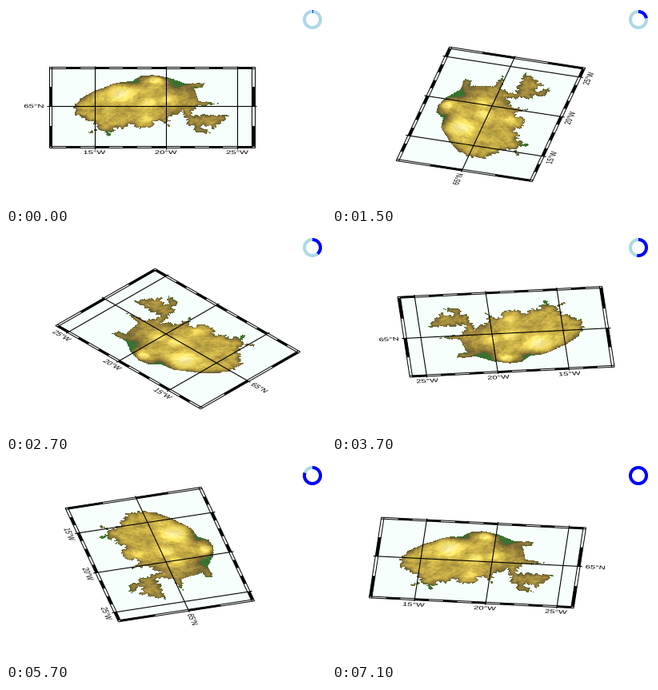
A matplotlib script for the animation above (7200 ms loop, 400 px wide and 250 px high).

```python
import numpy as np
import matplotlib.pyplot as plt
from matplotlib.animation import FuncAnimation
from matplotlib.collections import LineCollection, PolyCollection
from matplotlib.patches import PathPatch, Polygon, Wedge
from matplotlib.path import Path
from matplotlib.textpath import TextPath
from matplotlib.transforms import Affine2D

plt.rcParams["font.family"] = "Liberation Sans"

STAGE_W, STAGE_H, DPI = 400, 250, 100
FRAMES, INTERVAL = 72, 100
TILT = np.sin(np.radians(35))
SCALE = 250 / 14          # pixels per degree of longitude
BORDER = 3.4              # width of the chequered frame
PX = 72 / DPI             # one pixel in points
SEA = "#f6fffb"
rng = np.random.default_rng(7)


def mercator(lat):
    return np.degrees(np.log(np.tan(np.radians(45 + np.asarray(lat) / 2))))


def to_x(lon):
    return (np.asarray(lon) + 20) * SCALE


def to_y(lat):
    return (mercator(lat) - mercator(65)) * SCALE


X0, X1 = to_x(-26), to_x(-12)
Y0, Y1 = to_y(63), to_y(67)

# Capes and bays as (lon, lat), anticlockwise from the south-west.
CAPES = [
    (-22.7, 63.83), (-21.3, 63.85), (-20.3, 63.56), (-19.1, 63.4),
    (-18.2, 63.47), (-17.6, 63.74), (-16.6, 63.8), (-15, 64.25),
    (-14, 64.65), (-13.5, 65.08), (-13.65, 65.5), (-14.7, 65.8),
    (-15.2, 66.12), (-14.53, 66.38), (-15.4, 66.24), (-16, 66.53),
    (-16.5, 66.2), (-17.1, 66.2), (-17.5, 65.98), (-18.1, 66.18),
    (-18.8, 66.18), (-19.5, 65.75), (-20.2, 66.12), (-20.35, 65.66),
    (-21.15, 65.25), (-21.4, 65.9), (-22.4, 66.46), (-23.2, 66.4),
    (-22.6, 66.05), (-23.4, 66.18), (-24.5, 65.5), (-21.8, 65.46),
    (-22.2, 65.07), (-24.05, 64.9), (-22.3, 64.78), (-22, 64.1),
    (-22.6, 64.08)]

# Ice caps and lowlands: lon, lat, spread in pixels, metres.
RELIEF = [
    (-16.9, 64.42, 11, 800), (-18.8, 64.83, 7, 550), (-20.1, 64.7, 7, 450),
    (-19.2, 63.65, 6, 700), (-18.6, 65.7, 8, 350), (-20.6, 63.9, 9, -430),
    (-17.8, 63.75, 6, -350), (-16, 66.4, 8, -250)]

LEVELS = [0, 140, 290, 580, 920, 1700]
COLOURS = np.array([(58, 115, 50), (116, 100, 50), (146, 124, 58),
                    (200, 174, 70), (248, 224, 98), (253, 245, 185)])


def noise(shape, cell):
    """Smooth value noise between -1 and 1."""
    rows, cols = shape
    grid = rng.uniform(-1, 1, (int(rows / cell) + 2, int(cols / cell) + 2))

    def split(n):
        pos = np.arange(n) / cell
        i = pos.astype(int)
        f = pos - i
        return i, f * f * (3 - 2 * f)

    r, fr = split(rows)
    c, fc = split(cols)
    fr = fr[:, None]
    top = grid[r][:, c] * (1 - fc) + grid[r][:, c + 1] * fc
    low = grid[r + 1][:, c] * (1 - fc) + grid[r + 1][:, c + 1] * fc
    return top * (1 - fr) + low * fr


def neighbours(a):
    return [a] + [np.roll(a, d, axis) for axis in (0, 1) for d in (-1, 1)]


def coastline():
    """Join the capes and cut random fjords, deepest in the north."""
    lon, lat = np.array(CAPES + CAPES[:1]).T
    ring = to_x(lon) + 1j * to_y(lat)
    length = np.append(0, np.cumsum(abs(np.diff(ring))))
    s = np.arange(0, length[-1], 0.7)
    p = np.interp(s, length, ring.real) + 1j * np.interp(s, length, ring.imag)
    tangent = np.gradient(p)
    inward = 1j * tangent / abs(tangent)
    knots = np.arange(0, length[-1] + 3, 2.4)
    cut = np.interp(s, knots, rng.random(knots.size) ** 2)
    depth = 7.5 * np.clip((p.imag - to_y(64.55)) / 30, 0.12, 1)
    return p + inward * depth * (cut - 0.15)


def terrain():
    shape = rows, cols = 169, 250
    x, y = np.meshgrid(X0 + (np.arange(cols) + 0.5) * (X1 - X0) / cols,
                       Y0 + (np.arange(rows) + 0.5) * (Y1 - Y0) / rows)
    coast = coastline()
    outline = Path(np.column_stack([coast.real, coast.imag]))
    points = np.column_stack([x.ravel(), y.ravel()])
    land = outline.contains_points(points).reshape(shape)

    # Distance from the sea, by wearing the land away ring by ring.
    dist, rest = np.zeros(shape), land
    while rest.any():
        dist += rest
        rest = np.logical_and.reduce(neighbours(rest))
    for _ in range(2):
        dist = np.mean(neighbours(dist), axis=0)

    height = (510 + 1.2 * x) * (1 - np.exp(-dist / 5))
    shore = np.minimum(1, dist / 2.5)
    for lon, lat, size, metres in RELIEF:
        r2 = (x - to_x(lon)) ** 2 + (y - to_y(lat)) ** 2
        height += shore * metres * np.exp(-r2 / (2 * size * size))
    for cell, metres in ((16, 110), (7, 100), (3, 90)):
        height += shore * metres * noise(shape, cell)

    gy, gx = np.gradient(height)
    shade = 1 + 0.1 * np.tanh((gx - gy) / 130)
    rgba = np.zeros(shape + (4,), np.uint8)
    for k in range(3):
        tone = np.interp(height, LEVELS, COLOURS[:, k]) * shade
        rgba[..., k] = np.clip(tone, 0, 255)
    rgba[..., 3] = 255 * land
    return rgba


def box(xa, xb, ya, yb):
    return [(xa, ya), (xb, ya), (xb, yb), (xa, yb)]


def frame_lines():
    xa, xb, ya, yb = X0 - BORDER, X1 + BORDER, Y0 - BORDER, Y1 + BORDER
    lines = [[(xa, y), (xb, y)] for y in (ya, Y0, Y1, yb)]
    return lines + [[(x, ya), (x, yb)] for x in (xa, X0, X1, xb)]


def grid_lines():
    tick = BORDER + 2.6
    lines = [[(to_x(lon), Y0 - tick), (to_x(lon), Y1 + tick)]
             for lon in (-25, -20, -15)]
    return lines + [[(X0 - tick, 0), (X1 + tick, 0)]]


def checkers():
    cells = []
    for lon in range(-26, -12, 2):
        xa, xb = to_x(lon), to_x(lon + 1)
        cells += [box(xa, xb, Y0 - BORDER, Y0), box(xa, xb, Y1, Y1 + BORDER)]
    for lat in (64, 66):
        ya, yb = to_y(lat), to_y(lat + 1)
        cells += [box(X0 - BORDER, X0, ya, yb), box(X1, X1 + BORDER, ya, yb)]
    return cells


def label(text):
    path = TextPath((0, 0), text, size=11.3)
    b = path.get_extents()
    path = path.transformed(
        Affine2D().translate(-(b.x0 + b.x1) / 2, -(b.y0 + b.y1) / 2))
    return ax.add_patch(PathPatch(path, fc="black", lw=0, zorder=6))


fig = plt.figure(figsize=(STAGE_W / DPI, STAGE_H / DPI), dpi=DPI,
                 facecolor="white")
ax = fig.add_axes([0, 0, 1, 1])
ax.axis("off")

view = Affine2D()
placed = view + ax.transData
ax.add_patch(Polygon(box(X0, X1, Y0, Y1), fc=SEA, lw=0, transform=placed,
                     zorder=1))
image = ax.imshow(terrain(), origin="lower", extent=(X0, X1, Y0, Y1),
                  interpolation="nearest", aspect="auto", zorder=2)
image.set_transform(placed)
ax.set_xlim(0, STAGE_W)
ax.set_ylim(0, STAGE_H)

ax.add_collection(PolyCollection(checkers(), facecolors="black", linewidths=0,
                                 transform=placed, zorder=3), autolim=False)
for lines, width in ((grid_lines(), 1.1), (frame_lines(), 1.0)):
    ax.add_collection(LineCollection(lines, colors="black",
                                     linewidths=width * PX, transform=placed,
                                     zorder=4), autolim=False)

lon_labels = {lon: label(f"{-lon}°W") for lon in (-25, -20, -15)}
lat_label = label("65°N")

HUB = (383, STAGE_H - 17)
ax.add_patch(Wedge(HUB, 12, 0, 360, width=4, fc="lightblue", lw=0))
arc = ax.add_patch(Wedge(HUB, 12, 85, 90, width=4, fc="blue", lw=0, zorder=2))


def update(i):
    azimuth = i * 360 / FRAMES
    c, s = np.cos(np.radians(azimuth)), np.sin(np.radians(azimuth))
    view.set_matrix(np.array([[-c, s, STAGE_W / 2],
                              [-s * TILT, -c * TILT, STAGE_H / 2],
                              [0, 0, 1]]))

    # Labels sit on the two near sides and stay readable.
    from_north = azimuth < 90 or azimuth >= 270
    turn = -1 if from_north else 1
    y = Y1 + BORDER + 9.5 if from_north else Y0 - BORDER - 9.5
    x = X1 + BORDER + 19 if azimuth < 180 else X0 - BORDER - 19

    def place(patch, px, py):
        patch.set_transform(Affine2D().scale(turn).translate(px, py) + placed)

    for lon, patch in lon_labels.items():
        place(patch, to_x(lon), y)
    place(lat_label, x, 0)

    arc.set_theta1(90 - 360 * (i + 1) / FRAMES)
    return [image, arc, lat_label, *lon_labels.values()]


anim = FuncAnimation(fig, update, frames=FRAMES, interval=INTERVAL,
                     repeat=True, repeat_delay=0, blit=False)
plt.show()
```
